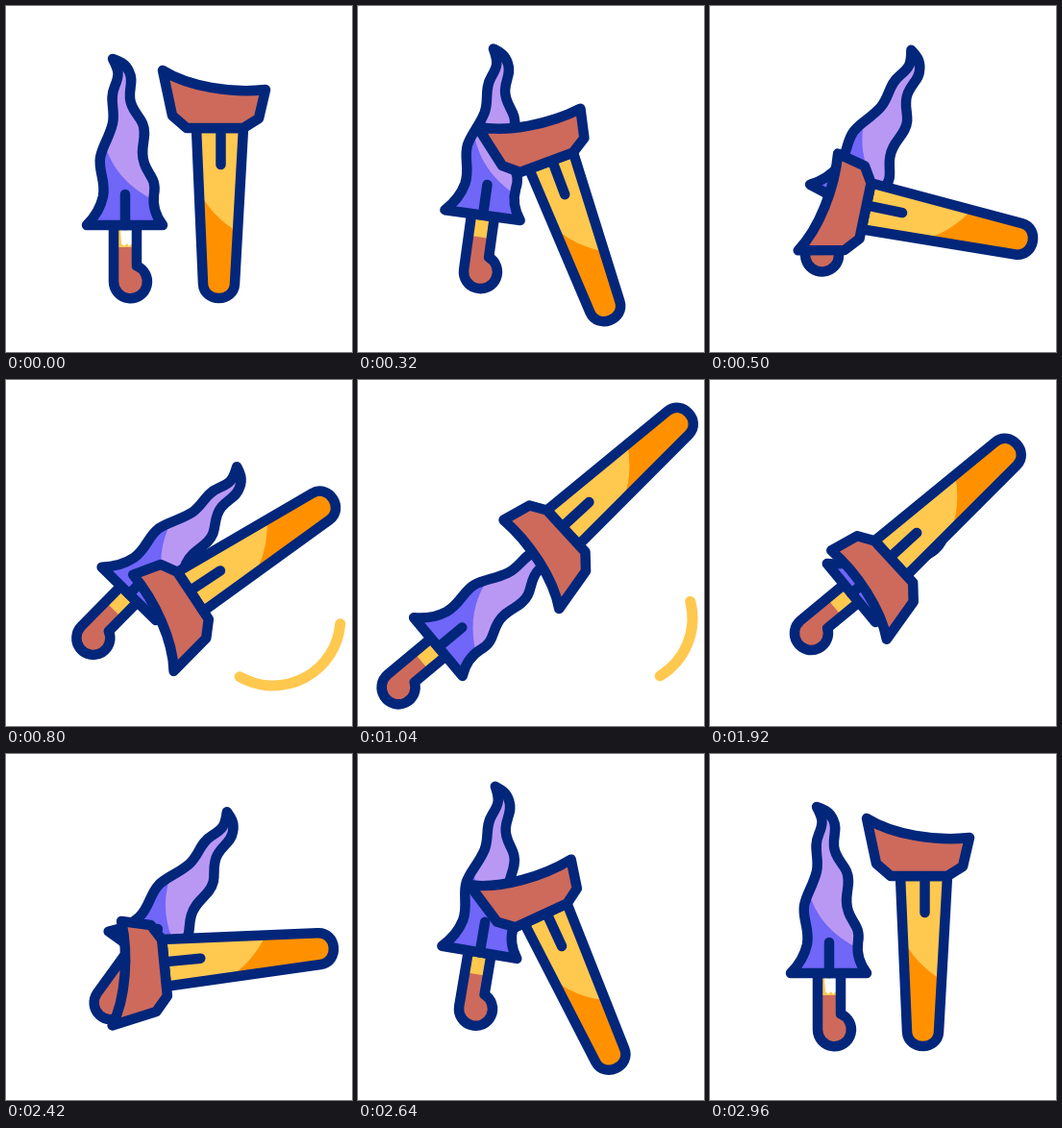
Write an HTML page that moves like this. It is 360x360 px and loops after 3600 ms.

```html
<!DOCTYPE html>
<html lang="en">
<head>
<meta charset="utf-8">
<title>Dagger and sheath</title>
<style>
  html, body { margin: 0; width: 100%; height: 100%; overflow: hidden; background: #fff; }
  svg { display: block; width: 100vw; height: 100vh; }
  .line { fill: none; stroke: #02267a; stroke-width: 10.5; stroke-linecap: round; stroke-linejoin: round; }
  .gold { fill: #ffc84f; }
  .orange { fill: #ff9100; }
  .wood { fill: #cd6a5c; }
  .lilac { fill: #b998f4; }
  .violet { fill: #7066f8; }
  #trail { fill: none; stroke: #ffc84f; stroke-width: 11; stroke-linecap: round; }
</style>
</head>
<body>
<svg viewBox="0 0 360 360">
  <defs>
    <path id="blade" d="M111 55C118 68 118 72 113 84C107 98 114 108 111 122C107 138 100 146 98 158C96 172 104 182 101 198C98 212 91 221 84 228H163C157 220 152 210 154 196C157 180 148 176 144 164C138 148 148 136 142 122C138 113 130 108 129 96C128 84 133 78 128 68C124 59 117 57 111 55Z"/>
    <path id="grip" d="M112 228V287A17.5 17.5 0 1 0 136 270.5V228Z"/>
    <path id="body" d="M198 127L205 289C206 309 237 309 238 289L247 127Z"/>
    <path id="mouth" d="M163 67C190 84 235 91 270 87L263 117L247 127H188L173 114Z"/>
    <clipPath id="inBlade"><use href="#blade"/></clipPath>
    <clipPath id="inGrip"><use href="#grip"/></clipPath>
    <clipPath id="inBody"><use href="#body"/></clipPath>
  </defs>

  <path id="trail"/>

  <g id="dagger">
    <use href="#grip" class="wood"/>
    <path class="gold" clip-path="url(#inGrip)" d="M105 226H145V251H105Z"/>
    <path id="glint" fill="#fff" d="M119 232H131V247L128 250L126 247L123 250L120 247Z"/>
    <use href="#grip" class="line"/>
    <use href="#blade" class="lilac"/>
    <path class="violet" clip-path="url(#inBlade)" d="M100 135C108 165 122 188 162 206V235H80V135Z"/>
    <path class="line" d="M124 196V228"/>
    <use href="#blade" class="line"/>
  </g>

  <g id="sheath">
    <use href="#body" class="gold"/>
    <path class="orange" clip-path="url(#inBody)" d="M200 190Q212 218 244 237V310H195V190Z"/>
    <path class="line" d="M223.5 127V165"/>
    <use href="#body" class="line"/>
    <use href="#mouth" class="wood"/>
    <use href="#mouth" class="line"/>
  </g>
</svg>

<script>
const LOOP = 3600;
const $ = id => document.getElementById(id);

// Poses: time, centre x, centre y, angle
const daggerKeys = [
  [260, 123.5, 180, 0], [350, 143, 166, 12.5], [500, 161.5, 162, 28],
  [650, 166, 171, 38], [800, 161.5, 188, 44.5], [950, 133, 229, 49],
  [1100, 116.6, 252, 50.5], [1340, 160, 213, 50.5], [1460, 176, 198.5, 50.5],
  [1600, 181.5, 193.3, 50.5], [1920, 184, 191, 50.5],
  [2340, 184, 191, 50.5], [2420, 167, 169, 36], [2540, 147, 149, 19],
  [2680, 131, 164, 7], [2820, 124.5, 178.5, 1.2], [2960, 123.5, 180, 0]
];
const sheathKeys = [
  [260, 216, 185, 0], [350, 215, 228, -33], [500, 218, 226.5, -78],
  [650, 233, 211, -105], [800, 243.7, 193.8, -123.4], [950, 257, 135, -131],
  [1100, 261, 115, -133], [1340, 244, 139, -133], [1460, 238.2, 147, -133],
  [1600, 235.8, 150, -132.5], [1920, 235, 151, -132.5],
  [2340, 235, 151, -132.5], [2420, 223, 218, -96], [2540, 213, 230, -50],
  [2680, 214, 216, -18], [2820, 215.6, 191, -3.2], [2960, 216, 185, 0]
];
// Trail: time, head angle, tail angle
const trailKeys = [
  [540, 135, 135], [660, 60, 133], [800, 5, 120],
  [1000, -14, 70], [1340, -16, -15.5], [1360, -16, -16]
];

// Monotone cubic interpolation: smooth, without overshoot
function slope(keys, i, c) {
  if (i === 0 || i === keys.length - 1) return 0;
  const [a, b, d] = [keys[i - 1], keys[i], keys[i + 1]];
  const s0 = (b[c] - a[c]) / (b[0] - a[0]);
  const s1 = (d[c] - b[c]) / (d[0] - b[0]);
  return s0 * s1 <= 0 ? 0 : 2 * s0 * s1 / (s0 + s1);
}

function sample(keys, t) {
  const last = keys.length - 1;
  if (t <= keys[0][0]) return keys[0].slice(1);
  if (t >= keys[last][0]) return keys[last].slice(1);
  const i = keys.findIndex(k => k[0] > t) - 1;
  const a = keys[i], b = keys[i + 1];
  const h = b[0] - a[0], u = (t - a[0]) / h, v = 1 - u;
  return a.slice(1).map((_, n) => {
    const c = n + 1;
    return a[c] * v * v * (1 + 2 * u) + b[c] * u * u * (3 - 2 * u)
      + h * u * v * (v * slope(keys, i, c) - u * slope(keys, i + 1, c));
  });
}

function place(id, keys, t) {
  const [x, y, angle] = sample(keys, t);
  const [, x0, y0] = keys[0];
  $(id).setAttribute('transform',
    `translate(${x} ${y}) rotate(${angle}) translate(${-x0} ${-y0})`);
}

function drawTrail(t) {
  const shown = t >= 540 && t < 1360;
  $('trail').style.display = shown ? '' : 'none';
  if (!shown) return;
  const at = deg => {
    const r = deg * Math.PI / 180;
    return `${278 + 70 * Math.cos(r)} ${248 + 70 * Math.sin(r)}`;
  };
  const [head, tail] = sample(trailKeys, t);
  $('trail').setAttribute('d', `M${at(tail)}A70 70 0 0 0 ${at(head - 0.1)}`);
}

function frame() {
  const t = performance.now() % LOOP;
  place('dagger', daggerKeys, t);
  place('sheath', sheathKeys, t);
  drawTrail(t);
  $('glint').style.display = t < 260 || t >= 2880 ? '' : 'none';
  requestAnimationFrame(frame);
}
frame();
</script>
</body>
</html>
```
